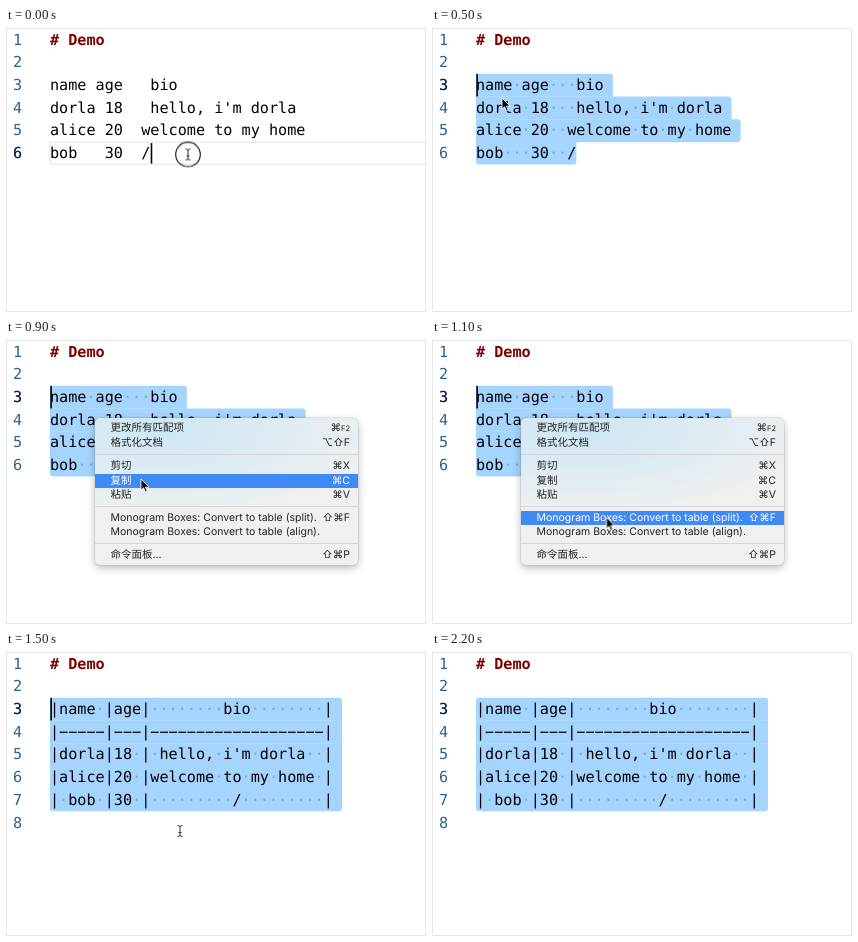
Animation, 420 px wide and 284 px high, one loop 2.3 s. Source, as an HTML page:

```html
<!DOCTYPE html>
<html lang="zh-CN">
<head>
<meta charset="utf-8">
<title>Text to table</title>
<style>
html, body { margin: 0; width: 420px; height: 284px; overflow: hidden; background: #fff; }
#stage { position: relative; width: 420px; height: 284px; overflow: hidden; }
#stage::after { content: ""; position: absolute; inset: 0; border: 1px solid #e6e6e6; }
svg { position: absolute; inset: 0; }
text { white-space: pre; font: 15.16px "DejaVu Sans Mono", monospace; text-rendering: geometricPrecision; }
.heading { fill: #800000; font-weight: bold; }
.number { fill: #2a658f; }
.number.active { fill: #0b1f50; }
.sel { fill: #a5d5ff; }
.dots { fill: #78a9d0; }
.lineBox { fill: none; stroke: #ebebeb; stroke-width: 1.5; }

#menu {
  position: absolute; left: 89px; top: 78.3px; width: 262.5px; height: 146.7px; border-radius: 5px;
  background: radial-gradient(ellipse 240px 85px at 65px 12px, #cde7f5, #f0f0f000), #f0f0f0;
  box-shadow: 0 0 0 .5px #0002, 0 3px 9px #0004;
  font: 10.5px/14.3px Inter, "Noto Sans CJK SC", "Noto Sans CJK", sans-serif;
  color: #222; text-rendering: geometricPrecision;
}
.item { position: absolute; left: 0; right: 0; height: 14.3px; padding: 0 7.5px 0 15.5px; white-space: nowrap; }
.keys { position: absolute; right: 7.5px; top: 0; font-family: Inter, "DejaVu Sans", sans-serif; }
.keys small { font-size: 7.5px; }
.rule { position: absolute; left: 0; right: 0; height: 1px; background: #d6d6d6; }

/* One step is 100 ms, 4.348% of the loop */
.anim { animation: 2300ms step-end infinite; }
@keyframes typed { 0% { opacity: 1 } 4.34%, 100% { opacity: 0 } }
@keyframes drag1 { 0% { opacity: 0 } 4.34% { opacity: 1 } 8.69%, 100% { opacity: 0 } }
@keyframes drag2 { 0% { opacity: 0 } 8.69% { opacity: 1 } 13.04%, 100% { opacity: 0 } }
@keyframes drag3 { 0% { opacity: 0 } 13.04% { opacity: 1 } 60.86%, 100% { opacity: 0 } }
@keyframes before { 0% { opacity: 1 } 60.86%, 100% { opacity: 0 } }
@keyframes after { 0% { opacity: 0 } 60.86%, 100% { opacity: 1 } }
@keyframes blink { 0% { opacity: 1 } 82.6%, 100% { opacity: 0 } }
@keyframes menu { 0% { opacity: 0 } 30.43% { opacity: 1 } 56.52% { opacity: .34 } 60.86%, 100% { opacity: 0 } }
@keyframes hoverFormat { 34.78% { background: #3f8af5; color: #fff } 39.13% { background: none; color: #222 } }
@keyframes hoverCopy { 39.13% { background: #3f8af5; color: #fff } 43.47% { background: none; color: #222 } }
@keyframes hoverSplit { 43.47%, 60.86% { background: #3f8af5; color: #fff } }
@keyframes ring { 0% { opacity: 1 } 8.69% { opacity: .65 } 17.39%, 100% { opacity: 0 } }
@keyframes beam {
  0% { transform: translate(182px, 126.5px); opacity: 1 }
  4.34% { transform: translate(122px, 97px) }
  8.69% { transform: translate(60.5px, 67px) }
  13.04% { transform: translate(46px, 58px); opacity: 1 }
  17.39% { transform: translate(174px, 179px); opacity: 0 }
  60.86% { transform: translate(174px, 179px); opacity: 1 }
  82.6% { transform: translate(177px, 194px) }
  86.95% { transform: translate(190px, 230px) }
  91.3% { transform: translate(204px, 268px); opacity: 1 }
  95.65%, 100% { transform: translate(210px, 300px); opacity: 0 }
}
@keyframes arrow {
  0% { transform: translate(46px, 58px); opacity: 0 }
  17.39% { transform: translate(52px, 59px); opacity: 1 }
  21.73% { transform: translate(70px, 70px) }
  26.08% { transform: translate(86px, 80px) }
  30.43% { transform: translate(89.5px, 82.5px) }
  34.78% { transform: translate(104px, 101px) }
  39.13% { transform: translate(135px, 139px) }
  43.47% { transform: translate(164px, 172px) }
  47.82% { transform: translate(174.5px, 177.5px); opacity: 1 }
  60.86%, 100% { transform: translate(174.5px, 177.5px); opacity: 0 }
}
</style>
</head>
<body>
<div id="stage">
  <svg id="editor" width="420" height="284"></svg>
  <div id="menu" class="anim" style="animation-name: menu"></div>
  <svg width="420" height="284">
    <g class="anim" style="animation-name: beam" fill="none" stroke="#333">
      <circle class="anim" style="animation-name: ring" r="12.3" stroke="#222" stroke-width="1.2"/>
      <path d="M-2.5-5.5Q0-5.5 0-4Q0-5.5 2.5-5.5M0-4V4M-2.5 5.5Q0 5.5 0 4Q0 5.5 2.5 5.5M-1.5 1.5H1.5"/>
    </g>
    <path class="anim" style="animation-name: arrow" d="M0 0V11.2L2.6 8.8L4.3 12.7L6.2 11.9L4.5 8.1H8Z"
      fill="#000" stroke="#fff" stroke-width=".9"/>
  </svg>
</div>
<script>
const CHAR = 9.126, ROW = 22.7, LEFT = 44, TOP = 0.4;
const plain = ["# Demo", "", "name age   bio", "dorla 18   hello, i'm dorla",
  "alice 20  welcome to my home", "bob   30  /"];
const table = ["# Demo", "", "|name |age|        bio        |", "|−−−−−|−−−|−−−−−−−−−−−−−−−−−−−|",
  "|dorla|18 | hello, i'm dorla  |", "|alice|20 |welcome to my home |",
  "| bob |30 |         /         |", ""];

const editor = document.getElementById("editor");
const colX = col => LEFT + col * CHAR;
const rowY = row => TOP + (row - 1) * ROW;

function add(parent, tag, attrs, content = "") {
  const el = document.createElementNS("http://www.w3.org/2000/svg", tag);
  for (const key in attrs) el.setAttribute(key, attrs[key]);
  el.textContent = content;
  return parent.appendChild(el);
}
const group = (parent, name) => add(parent, "g", { class: "anim", style: `animation-name: ${name}` });
const write = (parent, x, row, cls, content) =>
  add(parent, "text", { x, y: rowY(row) + 16.2, class: cls }, content);
const number = (parent, row, cls = "number") => write(parent, 7, row, cls, row);

function drawText(name, lines) {
  const g = group(editor, name);
  lines.forEach((line, i) => {
    number(g, i + 1);
    write(g, LEFT, i + 1, i ? "" : "heading", line);
  });
}

function caret(parent, row, col) {
  add(parent, "rect", { x: colX(col) + 0.3, y: rowY(row), width: 1.6, height: ROW });
}

// Rectangle with its own radius at each corner
function box(parent, x, y, w, h, [a, b, c, d]) {
  add(parent, "path", { class: "sel", d: `M${x + a} ${y}h${w - a - b}q${b} 0 ${b} ${b}v${h - b - c}
    q0 ${c} ${-c} ${c}h${c + d - w}q${-d} 0 ${-d} ${-d}v${a + d - h}q0 ${-a} ${a} ${-a}z` });
}

function drawSelection(name, lines, row, col, last) {
  const g = group(editor, name);
  const start = r => r === row ? col : 0;
  const end = r => r < row || r > last ? 0 : lines[r - 1].length + (r < last || lines === table ? 1 : 0);
  for (let r = row; r <= last; r++) {
    const x = colX(start(r)), w = (end(r) - start(r)) * CHAR;
    const corners = [r === row || start(r - 1) > 0, end(r - 1) < end(r), end(r + 1) < end(r), r === last]
      .map(round => round ? 3 : 0);
    box(g, x, rowY(r), w, ROW + (r < last ? 0.3 : 0), corners);
    write(g, x, r, "dots", lines[r - 1].slice(start(r)).replace(/[^ ]/g, "\u00a0").replace(/ /g, "·"));
  }
}

function drawCursor(name, row, col, caretName) {
  const g = group(editor, name);
  number(g, row, "number active");
  caret(caretName ? group(g, caretName) : g, row, col);
  return g;
}

drawSelection("drag1", plain, 5, 9, 6);
drawSelection("drag2", plain, 4, 2, 6);
drawSelection("drag3", plain, 3, 0, 6);
drawSelection("after", table, 3, 0, 7);
drawText("before", plain);
drawText("after", table);
const typed = drawCursor("typed", 6, 11);
add(typed, "rect", { class: "lineBox", x: LEFT, y: rowY(6) + 0.5, width: 380, height: ROW - 0.8 });
drawCursor("drag1", 5, 9);
drawCursor("drag2", 4, 2);
drawCursor("drag3", 3, 0);
drawCursor("after", 3, 0, "blink");

// Centre line, label, shortcut, hover animation
const items = [
  [88.6, "更改所有匹配项", "⌘<small>F2</small>"],
  [102.9, "格式化文档", "⌥⇧F", "hoverFormat"],
  [126.4, "剪切", "⌘X"],
  [140.7, "复制", "⌘C", "hoverCopy"],
  [155, "粘贴", "⌘V"],
  [178.2, "Monogram Boxes: Convert to table (split).", "⇧⌘F", "hoverSplit"],
  [192.4, "Monogram Boxes: Convert to table (align).", ""],
  [215.4, "命令面板...", "⇧⌘P"],
];
const menu = document.getElementById("menu");
menu.innerHTML = items.map(([y, label, keys, hover = "none"]) =>
  `<div class="item anim" style="top:${y - 85.45}px;animation-name:${hover}">${label}<span class="keys">${keys}</span></div>`
).join("") + [114.3, 166.2, 203.5].map(y => `<div class="rule" style="top:${y - 78.8}px"></div>`).join("");
</script>
</body>
</html>
```
